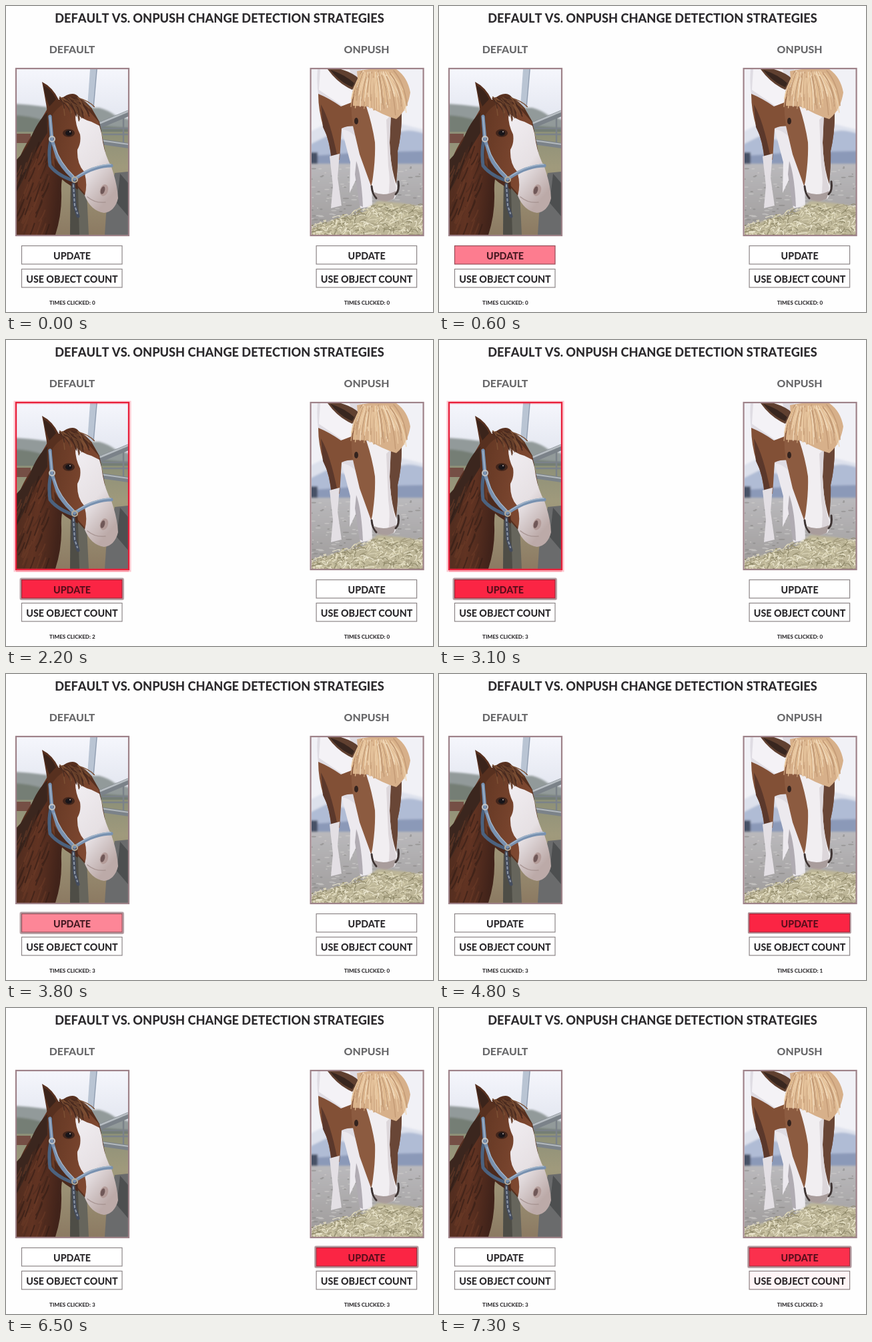
An HTML page for the animation above (7.4 s loop, 640x460 px).

```html
<!DOCTYPE html>
<html lang="en">
<head>
<meta charset="utf-8">
<title>Change detection strategies</title>
<style>
  html, body { margin: 0; width: 100%; height: 100%; overflow: hidden; background: #fefefe; }
  svg { display: block; width: 640px; height: 460px; }
  text { font-family: Lato, "Open Sans", sans-serif; font-weight: 800; text-anchor: middle; fill: #2c2a2d; }
  .title { font-size: 18.2px; font-kerning: none; }
  .name { font-size: 15.9px; fill: #68686a; }
  .label { font-size: 14.3px; }
  .count { font-size: 8.1px; }
  .line { fill: none; stroke-linecap: round; stroke-linejoin: round; }
</style>
</head>
<body>
<svg viewBox="0 0 640 460">
  <defs>
    <linearGradient id="sky" x2="0" y2="1">
      <stop stop-color="#f5f6fc"/><stop offset=".6" stop-color="#e6e9f2"/>
    </linearGradient>
    <linearGradient id="field" x2="0" y2="1">
      <stop stop-color="#8d9078"/><stop offset=".35" stop-color="#a09a7c"/><stop offset="1" stop-color="#8c7a62"/>
    </linearGradient>
    <linearGradient id="coat" x2="1" y2=".3">
      <stop stop-color="#49291d"/><stop offset=".55" stop-color="#613322"/><stop offset="1" stop-color="#41231a"/>
    </linearGradient>
    <linearGradient id="face" x2="1" y2=".4">
      <stop stop-color="#633723"/><stop offset="1" stop-color="#834b33"/>
    </linearGradient>
    <linearGradient id="blaze" x2=".5" y2="1">
      <stop stop-color="#f2eff3"/><stop offset=".6" stop-color="#e6e0e3"/><stop offset="1" stop-color="#bcaaa8"/>
    </linearGradient>
    <linearGradient id="gravel" x2="0" y2="1">
      <stop stop-color="#bab9bc"/><stop offset="1" stop-color="#9d9a99"/>
    </linearGradient>
    <filter id="soft" x="-20%" y="-20%" width="140%" height="140%"><feGaussianBlur stdDeviation=".6"/></filter>
    <filter id="haze" x="-20%" y="-20%" width="140%" height="140%"><feGaussianBlur stdDeviation="1.6"/></filter>
    <clipPath id="photo"><rect x="16" y="95" width="167" height="249"/></clipPath>
    <clipPath id="photo2"><rect x="458" y="95" width="167" height="249"/></clipPath>
  </defs>

  <text class="title" x="320" y="24.6">DEFAULT VS. ONPUSH CHANGE DETECTION STRATEGIES</text>

  <g clip-path="url(#photo)">
    <path fill="url(#sky)" d="M16 95H183V200H16Z"/>
    <g filter="url(#haze)">
      <path fill="#929a9a" d="M10 147Q34 148 62 152L140 153Q154 157 163 164L190 172V205H10Z"/>
      <path fill="#747e75" d="M10 164Q35 165 60 173L190 184V205H10Z"/>
    </g>
    <path fill="url(#field)" d="M16 189H183V344H16Z"/>
    <path fill="#754f45" d="M16 192H37V206H16Z"/>
    <g filter="url(#soft)">
      <path fill="#b9c4d3" d="M126 95H137L132 152H122Z"/>
      <path stroke="#8996aa" d="M136 95L131 152"/>
      <g class="line" stroke="#7b8289">
        <path stroke-width="9" d="M141 179L184 161"/>
        <path stroke="#b7bdc2" stroke-width="2.5" d="M141 176L184 158"/>
        <path stroke-width="2.5" d="M145 184H184M146 193H184M176 164V208"/>
        <path stroke-width="8" d="M142 204L184 210"/>
        <path stroke="#b3b9bd" stroke-width="2" d="M142 202L184 208"/>
      </g>
      <path fill="#6a6b6c" d="M163 251L183 249V344H148L150 313Z"/>
      <path fill="#4d4f50" d="M171 252L183 266V316L166 296Z"/>
      <path fill="#66655c" d="M97 263L121 281L124 344H96Z"/>
      <path fill="#4e4d46" d="M97 268L108 276L110 344H96Z"/>

      <path fill="url(#coat)" d="M16 344V244Q20 222 39 194L64 151L88 248Q82 259 83 281Q84 313 74 344Z"/>
      <path fill="#3b261e" d="M65 157Q46 173 36 202Q27 220 16 231V279Q31 252 41 225Q56 200 68 181Z"/>
      <g id="neck" class="line" stroke-width="2" opacity=".55"></g>
      <path fill="#57301f" d="M62 159Q58 134 54 114Q70 122 79 141L91 134Q103 129 109 137L128 153L140 174L150 226L142 263L120 287Q111 277 103 268Q78 257 68 240Q60 202 62 159Z"/>
      <path fill="url(#face)" d="M70 163Q85 141 110 142L139 174L145 231L120 284L103 265Q78 255 69 235Z"/>
      <path fill="#3b241b" d="M56 119Q69 126 75 140L65 151Q58 134 56 119Z"/>
      <path fill="#4c2a1d" d="M72 228Q85 249 107 260L108 276Q84 265 74 249Z"/>
      <path fill="url(#blaze)" d="M104 160Q115 171 128 174L140 180Q144 192 145 204Q149 226 158 242Q167 268 168 289Q163 309 147 311Q127 308 118 285Q123 267 117 249Q106 237 107 216Q113 206 111 193Q103 177 104 160Z"/>
      <ellipse cx="147" cy="277" rx="6" ry="9" fill="#b39b98" transform="rotate(17 147 277)"/>
      <ellipse cx="145" cy="277" rx="3" ry="6" fill="#705858" transform="rotate(17 145 277)"/>
      <path class="line" stroke="#a99694" stroke-width="1.5" d="M122 287Q134 297 149 295"/>
      <ellipse cx="94" cy="191" rx="9" ry="6" fill="#41251b"/>
      <ellipse cx="94" cy="191" rx="5" ry="4" fill="#181519"/>
      <circle cx="96" cy="189" r="1" fill="#bcaaa6"/>
      <g id="mane" class="line" stroke-width="1.5"></g>

      <g class="line">
        <path stroke="#4b627f" stroke-width="5" d="M66 166L68 199Q63 217 66 240Q76 254 102 263"/>
        <path stroke="#7891b0" stroke-width="5" d="M66 166L69 201L77 227Q84 244 103 260Q131 240 158 240"/>
        <path stroke="#a5b8cd" stroke-width="1.3" d="M66 167L69 198M72 209Q81 236 102 256M107 256Q132 239 157 238"/>
        <path stroke="#444c5d" stroke-width="5" d="M101 268L103 300L108 316"/>
        <path stroke="#8f99a8" stroke-width="2" stroke-dasharray="3 4" d="M101 269L103 300L107 312"/>
        <circle cx="69" cy="200" r="4" stroke="#c2c4c5" stroke-width="2"/>
        <circle cx="103" cy="261" r="4" stroke="#b5aa98" stroke-width="2"/>
      </g>
    </g>
  </g>

  <g clip-path="url(#photo2)">
    <path fill="#f1f1f6" d="M458 95H625V344H458Z"/>
    <g filter="url(#haze)">
      <path fill="#dde1ec" d="M450 192L474 180L520 190L590 177L635 188V244H450Z"/>
      <path fill="#b0bcd5" d="M450 211L480 196L533 206L590 190Q602 183 635 194V241H450Z"/>
      <path fill="#8b99b8" d="M450 226L530 220L635 218V244H450Z"/>
      <path fill="#465166" d="M455 220H467V244H455Z"/>
    </g>
    <path fill="url(#gravel)" d="M450 237H635V344H450Z" filter="url(#haze)"/>
    <g id="stones" filter="url(#soft)"></g>
    <g filter="url(#soft)">
      <path fill="#dfdce3" d="M467 95H532L541 161L549 230L548 302H531L525 244L508 191L475 163Q464 130 467 95Z"/>
      <path fill="#f4f2f6" d="M471 95H515L526 137L514 157Q482 135 469 126Z"/>
      <path fill="#825036" d="M468 132Q485 139 502 151L523 143L527 181Q512 179 503 184L500 231L488 235Q486 205 476 183Q468 157 468 132Z"/>
      <path fill="#5b382b" d="M472 148Q486 172 497 228L488 233Q486 202 475 182Z"/>
      <path fill="#e3dfe4" d="M485 226L500 222L497 258L503 300L487 304L490 270Z"/>
      <path fill="#ece9ee" d="M503 185Q516 187 529 201L547 242L549 301L531 304L526 258L515 281L516 235Z"/>
      <path fill="#b0abb2" d="M525 233Q533 255 535 302L530 300L523 253Z"/>
      <path fill="#604030" d="M482 95H502Q519 100 529 109L519 126Q498 117 482 95Z"/>
      <path fill="#38261f" d="M486 96Q508 103 522 116L519 122Q501 115 486 96Z"/>
      <path fill="#8c5b40" d="M521 120Q514 158 522 189L530 223L548 273L556 284L581 279Q588 245 587 218Q595 184 592 151Z"/>
      <path fill="#694636" d="M577 154L593 151Q594 189 587 218Q588 243 584 274L578 262L575 204Z"/>
      <path fill="#f1eef1" d="M540 151L577 157L575 205Q576 240 584 265Q590 276 582 290L568 294L553 289Q544 280 549 264Q554 231 553 205Q549 178 540 151Z"/>
      <path fill="#dcd6da" d="M570 171L577 164L575 206Q577 249 585 274L580 290L572 292Q577 267 573 241Z"/>
      <path fill="#a99d9c" d="M552 280Q567 287 585 278L581 290L568 295L554 290Z"/>
      <path class="line" stroke="#3e3433" stroke-width="3" d="M548 271Q549 283 555 289M588 264Q590 277 584 283"/>
      <ellipse cx="525" cy="173" rx="3" ry="5" fill="#33231e"/>
      <path fill="#d7b08a" d="M526 98Q552 92 585 95Q602 107 606 130Q602 156 585 170Q564 164 544 151L520 150Q520 133 528 121Z"/>
      <g id="forelock" class="line" stroke-width="1.4"></g>
    </g>
    <path fill="#bdb698" filter="url(#haze)" d="M450 337Q490 319 531 313L557 293L590 296L635 303V350H450Z"/>
    <g id="hay" class="line" stroke-width="1.1" filter="url(#soft)"></g>
  </g>

  <g id="columns"></g>
</svg>
<script>
const LOOP = 7400;
const $ = id => document.getElementById(id);

function randomizer(seed) {
  return () => (seed = (seed * 16807) % 2147483647) / 2147483647;
}

function scatter(id, count, seed, shape) {
  const rnd = randomizer(seed);
  $(id).innerHTML = Array.from({ length: count }, () => shape(rnd)).join('');
}

const pick = (rnd, list) => list[Math.floor(rnd() * list.length)];
const strand = (d, color) => `<path d="${d}" stroke="${color}"/>`;

scatter('neck', 60, 37, rnd => {
  const y = 205 + rnd() * 125, x = 20 + Math.max(0, 245 - y) * .5 + rnd() * 45;
  return strand(`M${x} ${y}q-3 10 -9 ${14 + rnd() * 14}`, pick(rnd, ['#2f1b15', '#6d3c28', '#4b2a1e']));
});
scatter('mane', 44, 71, rnd => {
  const x = 80 + rnd() * 29, y = 136 + rnd() * 8, dx = 5 + rnd() * 21;
  return strand(`M${x} ${y}q${dx * .7} 5 ${dx} ${10 + rnd() * 20}`, pick(rnd, ['#4a2b20', '#67402b', '#7c5034']));
});
scatter('forelock', 95, 29, rnd => {
  const x = 530 + rnd() * 51, y = 97 + rnd() * 12, side = (x - 550) * .65;
  return strand(`M${x} ${y}q${side * .8} 18 ${side} ${25 + rnd() * (28 + side * .5)}`,
    pick(rnd, ['#e9c8a1', '#c39a75', '#dfb88d', '#f0d8b8']));
});
scatter('stones', 170, 83, rnd => {
  const x = 458 + rnd() * 167, y = 242 + rnd() * 85;
  return `<ellipse cx="${x}" cy="${y}" rx="${1 + rnd() * 4}" ry="1" fill="${pick(rnd, ['#d0cdcc', '#84817f'])}" opacity=".55"/>`;
});
scatter('hay', 380, 47, rnd => {
  const x = 458 + rnd() * 167;
  const top = 297 + Math.max(0, 552 - x) * .34;
  const y = top + rnd() * (346 - top), angle = rnd() * Math.PI;
  const length = 4 + rnd() * 10;
  return strand(`M${x} ${y}q${length * .4} -3 ${Math.cos(angle) * length} ${Math.sin(angle) * length * .6}`,
    pick(rnd, ['#e2dcc0', '#d3ccaa', '#a39b7c', '#efead3', '#8d8768']));
});

const button = (id, y, label) => `
  <rect id="${id}" x="23.5" y="${y}" width="150.5" height="27.5" stroke-width="1.2"/>
  <text id="${id}Text" class="label" x="99" y="${y + 20.6}">${label}</text>`;

const column = (name, key, x) => `
  <g transform="translate(${x})">
    <text class="name" x="99" y="71">${name}</text>
    <g id="${key}Glow" fill="none" stroke="#f52443">
      <rect x="14" y="94" width="171" height="252" stroke-width="5" opacity=".25"/>
      <path d="M15 347.5H184" opacity=".3" stroke-width="2"/>
    </g>
    <rect id="${key}Frame" x="15" y="94" width="169" height="251" fill="none" stroke-width="2.2"/>
    <g id="${key}Ring" fill="none" stroke="#a78c92">
      <rect x="22" y="359" width="153.5" height="30.5" rx="1" stroke-width="1.3"/>
      <rect id="${key}Shade" x="21.5" y="358.5" width="154.5" height="31.5" rx="2" stroke-width="2.4"/>
    </g>
    ${button(key + 'Update', 360.5, 'UPDATE')}
    ${button(key + 'Object', 395.5, 'USE OBJECT COUNT')}
    <text id="${key}Count" class="count" x="99.4" y="449"></text>
  </g>`;

$('columns').innerHTML = column('DEFAULT', 'left', 0) + column('ONPUSH', 'right', 441.6);

// Each track is a list of [time, value]; hover and flash values run from 0 to 1.
const tracks = {
  left: {
    clicks: [1000, 1950, 2900],
    blur: 4700,
    hover: [[300, 0], [800, 1], [3600, 1], [4050, 0]],
    object: [[0, 0]],
    flash: [[950, 0], [1050, 1], [1550, 1], [1700, 0], [1950, 0], [2050, 1],
            [2500, 1], [2650, 0], [2900, 0], [3000, 1], [3450, 1], [3600, 0]]
  },
  right: {
    clicks: [4700, 5700, 6500],
    blur: LOOP,
    hover: [[4200, 0], [4650, 1], [7275, 1], [7775, 0]],
    object: [[7275, 0], [7775, 1]],
    flash: [[0, 0]]
  }
};

function valueAt(track, time) {
  const next = track.findIndex(([at]) => at > time);
  if (next === 0) return track[0][1];
  if (next < 0) return track[track.length - 1][1];
  const [t0, a] = track[next - 1], [t1, b] = track[next];
  return a + (b - a) * (time - t0) / (t1 - t0);
}

const mix = (from, to, k) => `rgb(${from.map((c, i) => Math.round(c + (to[i] - c) * k))})`;
const WHITE = [255, 255, 255], RED = [251, 37, 68];
const INK = [44, 42, 45], MAROON = [91, 13, 27];

function paintButton(id, level) {
  $(id).setAttribute('fill', mix(WHITE, RED, level));
  $(id).setAttribute('stroke', mix([140, 133, 135], [155, 35, 52], level));
  $(id + 'Text').style.fill = mix(INK, MAROON, level);
}

function paintColumn(key, time) {
  const { clicks, blur, hover, object, flash } = tracks[key];
  const glow = valueAt(flash, time);
  const focused = time >= clicks[0] && time < blur;
  paintButton(key + 'Update', valueAt(hover, time));
  paintButton(key + 'Object', valueAt(object, time));
  $(key + 'Frame').setAttribute('stroke', mix([158, 130, 137], [232, 31, 58], glow));
  $(key + 'Glow').setAttribute('opacity', glow);
  $(key + 'Ring').setAttribute('opacity', focused ? 1 : 0);
  $(key + 'Shade').setAttribute('opacity', time > clicks[0] + 300 ? .55 : 0);
  $(key + 'Count').textContent = 'TIMES CLICKED: ' + clicks.filter(at => at <= time).length;
}

function draw(now) {
  const time = Math.floor((now % LOOP) / 100) * 100;
  paintColumn('left', time);
  paintColumn('right', time);
}

const start = performance.now();
function tick() {
  draw(performance.now() - start);
  requestAnimationFrame(tick);
}
tick();
</script>
</body>
</html>
```
